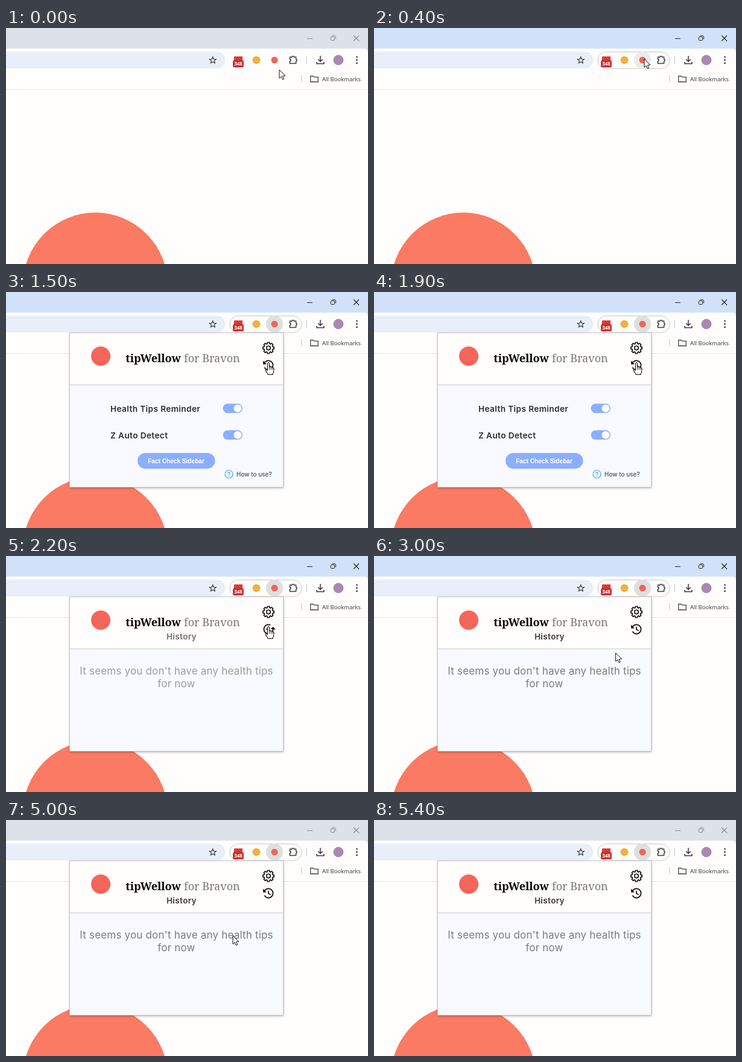
These frames come from a looping animation (600x390 px, 5.5 s). An HTML page with a canvas:

```html
<!DOCTYPE html>
<html lang="en">
<head>
<meta charset="utf-8">
<title>Extension popup demo</title>
<style>
html, body { margin: 0; width: 100%; height: 100%; overflow: hidden; background: #fff; }
canvas { display: block; width: 600px; height: 390px; }
</style>
</head>
<body>
<canvas id="stage"></canvas>
<script>
const LOOP = 5500, STEP = 100, W = 600, H = 390;
const CLICK_OPEN = 600, CLICK_HISTORY = 2000, BLUR = 5000;
const INK = '#3a3a3a', ACCENT = '#8bafff', CORAL = '#fb7a63', PAPER = '#fffefd';

const stage = document.getElementById('stage');
const c = stage.getContext('2d');
const dpr = window.devicePixelRatio || 1;
stage.width = W * dpr;
stage.height = H * dpr;

// time, x, y of the pointer tip
const path = [
  [0, 453, 69], [100, 453, 69], [300, 448, 51], [600, 448, 51],
  [900, 437, 96], [1200, 437, 96], [1500, 435, 117], [2500, 435, 117],
  [3400, 376, 191], [5000, 376, 191], [5300, 612, 150]
];

const clamp = v => Math.max(0, Math.min(1, v));
const ease = v => v * v * (3 - 2 * v);

function pointerAt(t) {
  for (let i = 1; i < path.length; i++) {
    const [t0, x0, y0] = path[i - 1], [t1, x1, y1] = path[i];
    if (t <= t1) {
      const k = ease((t - t0) / (t1 - t0));
      return [x0 + (x1 - x0) * k, y0 + (y1 - y0) * k];
    }
  }
  return null;
}

function paint(fill, stroke, width = 1) {
  if (fill) { c.fillStyle = fill; c.fill(); }
  if (stroke) { c.strokeStyle = stroke; c.lineWidth = width; c.stroke(); }
}

function box(x, y, w, h, r, fill, stroke, width) {
  c.beginPath();
  c.roundRect(x, y, w, h, r);
  paint(fill, stroke, width);
}

function disc(x, y, r, fill, stroke, width) {
  c.beginPath();
  c.arc(x, y, r, 0, Math.PI * 2);
  paint(fill, stroke, width);
}

function poly(points, fill, stroke, width, closed = true) {
  c.beginPath();
  points.forEach(([x, y]) => c.lineTo(x, y));
  if (closed) c.closePath();
  paint(fill, stroke, width);
}

const line = (stroke, width, ...points) => poly(points, null, stroke, width, false);

function label(str, x, y, font, color, align = 'left', spacing = 0) {
  c.font = font;
  c.letterSpacing = spacing + 'px';
  c.textAlign = align;
  c.textBaseline = 'alphabetic';
  c.fillStyle = color;
  c.fillText(str, x, y);
}

function at(x, y, draw, angle = 0) {
  c.save();
  c.translate(x, y);
  c.rotate(angle);
  draw();
  c.restore();
}

function titleBar(active) {
  c.fillStyle = active ? '#d1e1fa' : '#dce2e9';
  c.fillRect(0, 0, W, 46);
  const ink = active ? '#222' : '#868a8f';
  line(ink, 1, [499, 17.5], [508, 17.5]);
  box(538.5, 14.5, 6, 6, 1.5, null, ink);
  line(ink, 1, [540.5, 12.7], [545, 12.7], [546.4, 14], [546.4, 18.5]);
  line(ink, 1.1, [576, 12.5], [585, 21.5]);
  line(ink, 1.1, [585, 12.5], [576, 21.5]);
}

function star() {
  const points = [];
  for (let i = 0; i < 10; i++) {
    const r = i % 2 ? 2.6 : 5.7, a = i * Math.PI / 5 - Math.PI / 2;
    points.push([r * Math.cos(a), r * Math.sin(a)]);
  }
  poly(points, null, '#444', 1.3);
}

function puzzle() {
  c.beginPath();
  c.moveTo(-5.5, -4.5);
  c.lineTo(-2, -4.5);
  c.arc(-0.3, -4.7, 1.4, Math.PI, 0);
  c.lineTo(4.6, -4.5);
  c.lineTo(4.6, -1);
  c.arc(4.8, 0.7, 1.4, -Math.PI / 2, Math.PI / 2);
  c.lineTo(4.6, 6);
  c.lineTo(-5.5, 6);
  c.lineTo(-5.5, 2.8);
  c.arc(-5.5, 0.9, 1.7, Math.PI / 2, -Math.PI / 2, true);
  c.closePath();
  paint(null, INK, 1.5);
}

function toolbar(t) {
  box(-10, 34, W + 10, 67, [0, 7, 0, 0], PAPER);
  line('#e0e1e4', 1, [0, 101.5], [W, 101.5]);
  box(-20, 39, 383, 28, 14, '#e9eff8');
  at(342.8, 53.4, star);

  if (t >= 200) {
    box(371, 39.5, 119, 27.5, 13.75, PAPER, '#c5c7c8');
    disc(445, 53, 14, t < CLICK_OPEN ? '#ebebeb' : '#dfdfdf');
  }
  box(378, 47, 14, 10, 0, '#d93a30');
  box(376, 53, 18, 12, 3, '#cb2c2a');
  label('348', 385, 62, 'bold 8px "Open Sans", sans-serif', '#fff', 'center');
  disc(415, 53, 6.5, '#f3b03d');
  disc(445, 53, 5.5, '#f0645a');
  at(476, 52.5, puzzle);
  line('#b7cff5', 1.3, [498.2, 47], [498.2, 60]);

  line(INK, 1.6, [521, 46], [521, 55]);
  line(INK, 1.6, [517.3, 51.7], [521, 55.4], [524.7, 51.7]);
  line(INK, 1.6, [515, 56], [515, 59], [527, 59], [527, 56]);
  disc(551, 53, 8.5, '#a988b4');
  [47.8, 53, 58.2].forEach(y => disc(581.5, y, 1.4, INK));

  line('#b7cff5', 1.3, [490, 78], [490, 90]);
  poly([[504.7, 79.5], [509, 79.5], [510.7, 81.2], [517.3, 81.2], [517.3, 89], [504.7, 89]], null, '#444', 1.3);
  label('All Bookmarks', 524, 87.5, '9.6px "Open Sans", sans-serif', '#333');
}

function gear() {
  c.beginPath();
  for (let i = 0; i < 8; i++) {
    const a = i * Math.PI / 4 - Math.PI / 2;
    [[-0.3, 7.2], [-0.17, 9.4], [0.17, 9.4], [0.3, 7.2]].forEach(([d, r]) =>
      c.lineTo(r * Math.cos(a + d), r * Math.sin(a + d)));
  }
  c.closePath();
  c.lineJoin = 'round';
  paint(null, '#111', 1.7);
  disc(0, 0, 3.2, null, '#111', 1.6);
}

function historyIcon() {
  c.beginPath();
  c.arc(0, 0, 7.6, -2.8, 2.65);
  paint(null, '#111', 1.9);
  poly([[-8.9, -7.5], [-8.9, -1.5], [-3, -1.5]], '#111');
  line('#111', 1.7, [0, -4.2], [0, 0.4], [3.4, 2.5]);
}

function toggle(y) {
  box(359.5, y - 8, 32.5, 15.5, 7.75, ACCENT);
  disc(384, y - 0.2, 6.4, '#fff');
}

function brandTitle() {
  const bold = 'bold 18px "Noto Serif", serif', plain = '18px "Noto Serif", serif';
  const name = 'tipWellow', rest = 'for Bravon', gap = 5;
  c.letterSpacing = '0px';
  c.font = bold;
  const nameWidth = c.measureText(name).width;
  c.font = plain;
  const x = 293 - (nameWidth + gap + c.measureText(rest).width) / 2;
  label(name, x, 116, bold, '#050505');
  label(rest, x + nameWidth + gap, 116, plain, '#777');
}

function settingsView() {
  const row = '600 13.6px Inter, sans-serif';
  label('Health Tips Reminder', 173, 197.5, row, '#2b2b2b', 'left', 0.4);
  label('Z Auto Detect', 173, 241.5, row, '#2b2b2b', 'left', 0.4);
  toggle(192.5);
  toggle(236.5);
  box(218, 266, 128.5, 26, 13, ACCENT);
  label('Fact Check Sidebar', 282, 282.5, 'bold 10.1px "Liberation Sans", sans-serif', '#fff', 'center');
  disc(369.5, 301, 6.5, null, '#4da3ef', 1.2);
  label('?', 369.5, 304.7, '600 10px Inter, sans-serif', '#3d98ea', 'center');
  label('How to use?', 382, 304.5, '500 9.8px Inter, sans-serif', '#4c4c4c', 'left', 0.1);
}

function historyView(t) {
  c.globalAlpha = 0.4 + 0.6 * clamp((t - CLICK_HISTORY) / 350);
  label('History', 291, 138, '700 13.4px Inter, sans-serif', '#4d4d4d', 'center', 0.3);
  const font = '17px Inter, sans-serif';
  label("It seems you don't have any health tips", 282.5, 196, font, '#7c7c7c', 'center', 0.18);
  label('for now', 282.5, 217, font, '#7c7c7c', 'center', 0.18);
  c.globalAlpha = 1;
}

function popup(t) {
  c.save();
  c.shadowColor = 'rgba(0,0,0,.32)';
  c.shadowBlur = 4 * dpr;
  c.shadowOffsetY = dpr;
  box(105.5, 68, 354, 254.5, 0, PAPER);
  c.restore();
  c.fillStyle = '#f8faff';
  c.fillRect(105.5, 153, 354, 169.5);
  box(105.5, 67.5, 354, 255, 0, null, '#c4c5c8');
  line('#cacbce', 1, [106, 153.5], [459, 153.5]);

  disc(157, 106, 16, '#f5655a');
  brandTitle();
  at(435, 92.5, gear);
  const spin = clamp((t - CLICK_HISTORY) / 500);
  at(435, 121, historyIcon, spin * Math.PI * 2);
  if (t < CLICK_HISTORY) settingsView();
  else historyView(t);
}

function arrow() {
  poly([[0, 0], [0, 14], [3.2, 11.2], [5.4, 16.2], [7.7, 15.2], [5.5, 10.3], [9.9, 10]], '#fff', '#111', 1);
}

function hand() {
  c.beginPath();
  c.moveTo(-1.5, 1);
  c.quadraticCurveTo(0, -1.4, 1.5, 1);
  c.lineTo(1.5, 7);
  c.quadraticCurveTo(3, 5.5, 4.3, 7.4);
  c.quadraticCurveTo(5.8, 6.4, 6.8, 8.3);
  c.quadraticCurveTo(8.8, 7.8, 9, 10);
  c.lineTo(8.6, 15);
  c.lineTo(7, 19.5);
  c.lineTo(-0.5, 19.5);
  c.lineTo(-4.8, 12.5);
  c.quadraticCurveTo(-4.5, 9.8, -1.5, 12.5);
  c.closePath();
  paint('#fff', '#111', 1.1);
  [1.7, 4.3, 6.8].forEach(x => line('#111', 0.9, [x, 8], [x, 11.5]));
}

function pointer(t) {
  const p = pointerAt(t);
  if (!p) return;
  const [x, y] = p;
  const overIcon = t >= CLICK_OPEN && Math.abs(x - 435) < 10 && y > 82 && y < 131;
  at(x, y, overIcon ? hand : arrow);
}

function draw(t) {
  c.setTransform(dpr, 0, 0, dpr, 0, 0);
  c.lineJoin = 'miter';
  c.fillStyle = PAPER;
  c.fillRect(0, 0, W, H);
  disc(148, 425, 120, CORAL);
  titleBar(t >= 300 && t < BLUR);
  toolbar(t);
  if (t >= CLICK_OPEN) popup(t);
  pointer(t);
}

const start = performance.now();
function tick() {
  const t = (performance.now() - start) % LOOP;
  draw(Math.floor(t / STEP) * STEP);
  requestAnimationFrame(tick);
}
tick();
</script>
</body>
</html>
```
